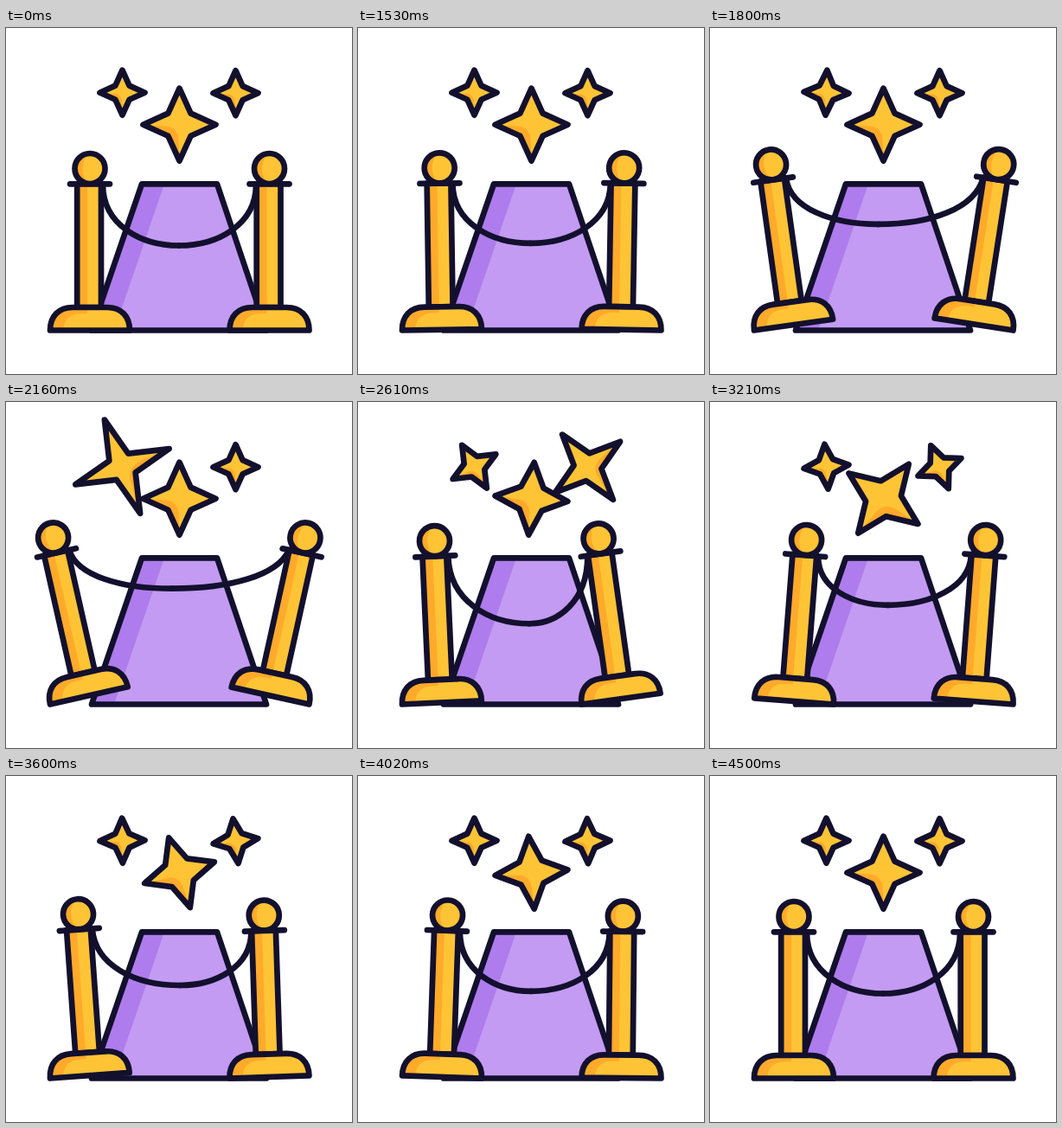
Write an HTML page with a canvas that moves like this. It is 400 px wide and 400 px high and loops after 4530 ms.

```html
<!DOCTYPE html>
<html lang="en">
<head>
<meta charset="utf-8">
<title>Red carpet stars</title>
<style>
  html, body { margin: 0; width: 100%; height: 100%; overflow: hidden; background: #fff; }
  canvas { display: block; width: 400px; height: 400px; }
</style>
</head>
<body>
<canvas id="stage" width="400" height="400"></canvas>
<script>
const LOOP = 4530, STEP = 30, START = 1500, END = 4500;
const INK = '#13102e', GOLD = '#ffc436', AMBER = '#ffaa2a', LILAC = '#c39bf2', VIOLET = '#ae7cec';
const RAD = Math.PI / 180, FLOOR = 349.5, POST_GAP = 207.5;
const ctx = document.getElementById('stage').getContext('2d');

// [time, value] keys; the first stretch eases out, the others ease in and out
const LEFT_TILT = [[START, 0], [2200, -12.8], [3030, 8], [3530, -4.4], [4030, 2], [4480, 0]];
const RIGHT_TILT = [[START, 0], [2120, 12.8], [2620, -8], [3110, 5], [3600, -1.9], [4050, 0.6], [4450, 0]];
const ROPE_X = [[START, 200], [2130, 192], [2620, 198], [3150, 206], [3600, 201], [4200, 200]];
const ROPE_Y = [[START, 251.5], [2130, 215.3], [2620, 256.3], [3150, 234.5], [3600, 242], [4250, 251.5]];

const STARS = [
  { x: 134.5, y: 74.7, r: 26, grow: 1.23, delay: 0 },
  { x: 265.5, y: 75.2, r: 26, grow: 1.23, delay: 500 },
  { x: 200.5, y: 111.7, r: 42, grow: 0.55, delay: 800 }
];

function track(keys, t) {
  if (t <= keys[0][0]) return keys[0][1];
  const i = keys.findIndex(k => k[0] > t);
  if (i < 0) return keys[keys.length - 1][1];
  const [t0, v0] = keys[i - 1], [t1, v1] = keys[i];
  const p = (t - t0) / (t1 - t0);
  const e = i === 1 ? Math.sin(p * Math.PI / 2) : (1 - Math.cos(p * Math.PI)) / 2;
  return v0 + (v1 - v0) * e;
}

function fill(path, color) {
  ctx.fillStyle = color;
  ctx.fill(new Path2D(path));
}

function line(path) {
  ctx.stroke(new Path2D(path));
}

function drawCarpet() {
  const edge = `M157 180.3H244L301 ${FLOOR}H99Z`;
  fill(edge, LILAC);
  fill(`M157 180.3H183L125 ${FLOOR}H99Z`, VIOLET);
  line(edge);
}

// A post tips over whichever corner of its foot it leans towards
const pivotX = (tilt, shift) => (tilt < 0 ? 51 : 143) + shift;

function ropeEnd(x, tilt, shift) {
  const px = pivotX(tilt, shift), a = tilt * RAD;
  const dx = x + shift - px, dy = 181 - FLOOR;
  return [px + dx * Math.cos(a) - dy * Math.sin(a), FLOOR + dx * Math.sin(a) + dy * Math.cos(a)];
}

function drawRope(t, left, right) {
  const mx = track(ROPE_X, t), my = track(ROPE_Y, t);
  const half = ([x, y]) => {
    const side = Math.sign(x - mx);
    const inset = Math.max(0, Math.abs(x - mx) - 89) * 0.3;
    return `M${x} ${y}C${x - side * inset} ${y + (my - y) * 0.66} ${(x + mx) / 2} ${my} ${mx} ${my}`;
  };
  line(half(ropeEnd(112, left, 0)));
  line(half(ropeEnd(81.5, right, POST_GAP)));
}

function drawPost(tilt, shift) {
  const px = pivotX(tilt, shift);
  const pole = 'M82.2 180H110V323H82.2Z';
  const foot = `M51 ${FLOOR}C51 333 61 323 77 323H117C133 323 143 333 143 ${FLOOR}Z`;
  const ball = 'M79.5 162.5a17.5 17.5 0 1 1 35 0a17.5 17.5 0 1 1 -35 0Z';
  ctx.save();
  ctx.translate(px, FLOOR);
  ctx.rotate(tilt * RAD);
  ctx.translate(shift - px, -FLOOR);
  fill(pole, GOLD);
  fill('M82.2 180H94V323H82.2Z', AMBER);
  line(pole);
  fill(foot, GOLD);
  fill('M52 348C52 333 62 324 77 324H94V330H88C74 330 68 336 66 348Z', AMBER);
  line(foot);
  fill(ball, GOLD);
  fill('M97 145A17.5 17.5 0 0 0 97 180C86 174.5 86 150.5 97 145Z', AMBER);
  line(ball);
  line('M74 180.3H120');
  ctx.restore();
}

// Fast whirl, then a long settling to one full turn
function spin(t) {
  if (t <= 1780) return 0;
  if (t < 2110) {
    const p = (t - 1780) / 330;
    return 564 * p * p - 332 * p ** 3;
  }
  return 360 - Math.max(0, 129 * Math.exp((2110 - t) / 350) - 1);
}

function swell(t) {
  if (t <= 1810) return 0;
  if (t < 2160) return ((t - 1810) / 350) ** 2.5;
  return Math.max(0, 1 - (t - 2160) / 800) ** 3;
}

function drawStar(star, time) {
  const t = time - star.delay;
  const scale = 1 + star.grow * swell(t);
  const r = star.r * scale;
  const n = r * (0.44 - 0.125 * (scale - 1)) * Math.SQRT1_2;
  const edge = `M0 ${-r}L${n} ${-n}L${r} 0L${n} ${n}L0 ${r}L${-n} ${n}L${-r} 0L${-n} ${-n}Z`;
  ctx.save();
  ctx.translate(star.x, star.y);
  ctx.rotate(spin(t) * RAD);
  fill(edge, GOLD);
  fill(`M${-r} 0L${-r * 0.3} ${r * 0.05}Q${-r * 0.05} ${r * 0.1} ${-r * 0.02} ${r * 0.4}L0 ${r}L${-n} ${n}Z`, AMBER);
  line(edge);
  ctx.restore();
}

function draw(t) {
  const left = track(LEFT_TILT, t), right = track(RIGHT_TILT, t);
  ctx.fillStyle = '#fff';
  ctx.fillRect(0, 0, 400, 400);
  ctx.strokeStyle = INK;
  ctx.lineWidth = 6.7;
  ctx.lineJoin = ctx.lineCap = 'round';
  drawCarpet();
  drawRope(t, left, right);
  drawPost(left, 0);
  drawPost(right, POST_GAP);
  STARS.forEach(star => drawStar(star, t));
}

const origin = performance.now();
function tick() {
  const t = Math.floor(((performance.now() - origin) % LOOP) / STEP) * STEP;
  draw(t >= END ? 0 : t);
  requestAnimationFrame(tick);
}
tick();
</script>
</body>
</html>
```
